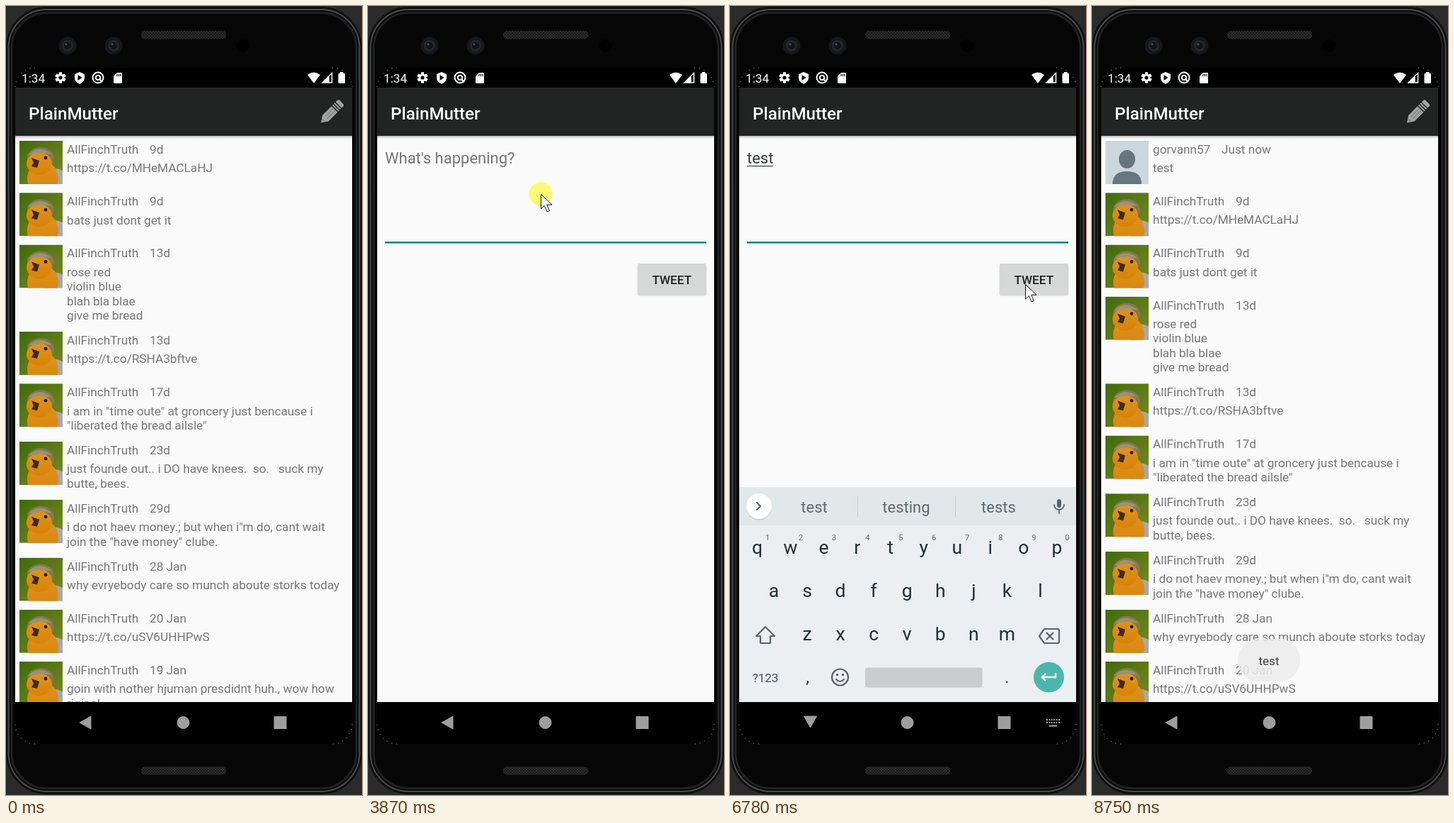
An HTML page for the animation above (9.06 s loop, 503x1112 px).

```html
<!DOCTYPE html>
<html lang="en">
<head>
<meta charset="utf-8">
<title>Phone demo</title>
<style>
html, body { margin: 0; width: 100%; height: 100%; overflow: hidden; background: #2b2b2c; }
svg { display: block; width: 503px; height: 1112px; font-family: Roboto, sans-serif; }
text { white-space: pre; }
.mid { text-anchor: middle; }
.line { fill: none; stroke: #56646b; stroke-width: 2.2; stroke-linejoin: round; stroke-linecap: round; }
</style>
</head>
<body>
<svg id="stage" viewBox="0 0 503 1112"></svg>
<script>
const LOOP = 9060;
const NAME = 'AllFinchTruth';
const ROWS = [
  ['9d', 'https://t.co/MHeMACLaHJ'],
  ['9d', 'bats just dont get it'],
  ['13d', 'rose red', 'violin blue', 'blah bla blae', 'give me bread'],
  ['13d', 'https://t.co/RSHA3bftve'],
  ['17d', 'i am in "time oute" at groncery just bencause i', '"liberated the bread ailsle"'],
  ['23d', 'just founde out.. i DO have knees.  so.   suck my', 'butte, bees.'],
  ['29d', 'i do not haev money.; but when i"m do, cant wait', 'join the "have money" clube.'],
  ['28 Jan', 'why evryebody care so munch aboute storks today'],
  ['20 Jan', 'https://t.co/uSV6UHHPwS'],
  ['19 Jan', 'goin with nother hjuman presdidnt huh., wow how', 'riginal..']
];

const rect = (x, y, w, h, fill, more = '') =>
  `<rect x="${x}" y="${y}" width="${w}" height="${h}" fill="${fill}" ${more}/>`;
const disc = (x, y, r, fill, more = '') =>
  `<circle cx="${x}" cy="${y}" r="${r}" fill="${fill}" ${more}/>`;
const path = (d, more = '') => `<path d="${d}" ${more}/>`;
const text = (x, y, size, fill, str, more = '') =>
  `<text x="${x}" y="${y}" font-size="${size}" fill="${fill}" ${more}>${str}</text>`;

function row(y, pic, name, timeX, [age, ...lines]) {
  const grey = '#777';
  return `<use href="#${pic}" x="19" y="${y}"/>` +
    text(86, y + 18, 17.2, grey, name) + text(timeX, y + 18, 17.2, grey, age) +
    lines.map((s, i) => text(86, y + 44.3 + i * 20.4, 17.2, grey, s)).join('');
}

function rows() {
  let y = 190;
  return ROWS.map(r => {
    const out = row(y, 'bird', NAME, 203, r);
    y += Math.max(73.2, 41 + 20.4 * (r.length - 1));
    return out;
  }).join('');
}

const windowBack = rect(13, 87, 476, 953, '#000') + rect(13, 183, 476, 798, '#fafafa') +
  rect(13, 183, 476, 4, 'url(#drop)') + rect(13, 115, 476, 68, '#212423') +
  text(32, 159.6, 24.2, '#fff', 'PlainMutter', 'font-weight="500"');

const pencil = `<g transform="translate(445 164.5) rotate(-45)" fill="#a3a3a3">
  ${path('M0 0L9-6H27V6H9Z')}${rect(28.5, -6, 2, 12, '#a3a3a3')}${rect(32, -6, 2, 12, '#a3a3a3')}
  ${path('M35.5-6H38Q41-6 41-3V3Q41 6 38 6H35.5Z')}
  ${path('M10-2H26M10 2H26M5-3V3', 'stroke="#777" fill="none"')}</g>`;

function keyRow(keys, x, y) {
  return [...keys].map((k, i) => text(x + i * 47.05, y, 26.5, '#1f2e35', k, 'class="mid"')).join('');
}

const keyboard = rect(13, 678, 476, 303, '#ebeff1') + rect(13, 678, 476, 54, '#e2e7ea') +
  disc(41, 706.5, 18, '#c5cace') + disc(41, 705, 18, '#fff') +
  rect(462, 695, 6, 12, '#56646b', 'rx="3"') +
  path('M458 703a7 7 0 0 0 14 0M465 711v4', 'class="line" style="stroke-width:1.8"') +
  `<g id="tools">${path('M43 700l-5 5 5 5', 'class="line"')}
    <circle cx="102" cy="702" r="6" class="line"/>${path('M107 707l6 6', 'class="line"')}
    ${path('M166 696h14q2 0 2 2v10l-6 6h-10q-2 0-2-2v-14q0-2 2-2M182 708h-4q-2 0-2 2v4M168 707q4 4 8 0', 'class="line" style="stroke-width:1.8"')}
    ${disc(169.5, 702, 1.3, '#56646b')}${disc(176.5, 702, 1.3, '#56646b')}
    ${text(241.5, 711.5, 18, '#56646b', 'GIF', 'class="mid" font-weight="900" letter-spacing="1"')}
    ${rect(302, 695, 21, 21, '#66737a', 'rx="2"')}${rect(353.5, 691, 1, 28, '#c8ced1')}
    ${[389.5, 397.5, 405.5].map(x => disc(x, 705, 2.6, '#56646b')).join('')}</g>` +
  `<g id="words">${path('M38 700l5 5-5 5', 'class="line"')}
    ${[['test', 119], ['testing', 249], ['tests', 379.5]].map(([s, x]) =>
      text(x, 714, 22, '#5d6a70', s, 'class="mid"')).join('')}
    ${rect(180, 691, 1, 29, '#c5cbce')}${rect(318, 691, 1, 29, '#c5cbce')}</g>` +
  keyRow('qwertyuiop', 38.5, 772) + keyRow('asdfghjkl', 62, 832.5) + keyRow('zxcvbnm', 109, 894) +
  [...'1234567890'].map((d, i) => text(53 + i * 47.05, 753, 11.5, '#5f6c72', d, 'class="mid"')).join('') +
  path('M50 875l13 13h-6v10h-14v-10h-6z', 'class="line"') +
  path('M444 878h19q2 0 2 2v16q0 2-2 2h-19l-7-10zM447.500 883.500l9 9m0-9l-9 9', 'class="line"') +
  text(50, 952.5, 17, '#46545b', '?123', 'class="mid"') +
  text(109.5, 954, 24, '#1f2e35', ',', 'class="mid"') + text(391.5, 954, 24, '#46545b', '.', 'class="mid"') +
  `<circle cx="155.500" cy="946" r="11.500" class="line"/>` +
  path('M150 949q5.500 6 11 0', 'class="line"') + disc(151.5, 942.5, 1.7, '#56646b') + disc(159.5, 942.5, 1.7, '#56646b') +
  rect(191, 932.5, 165.500, 28, '#c9cdd0', 'rx="3"') + disc(450.5, 946, 21.500, '#4db6ac') +
  path('M460 940v6h-19m5-5l-5 5 5 5', 'fill="none" stroke="#fff" stroke-width="2.4"');

function gear() {
  let teeth = '';
  for (let a = 0; a < 360; a += 60) teeth += rect(75, 93.5, 4, 15, '#fff', `transform="rotate(${a} 77 101)"`);
  return teeth + disc(77, 101, 5.5, '#fff') + disc(77, 101, 2.6, '#000');
}

const statusBar = text(22, 108, 17.2, '#fff', '1:34') + gear() +
  path('M104 93l7 3v5q0 6-7 9-7-3-7-9v-5z', 'fill="#fff"') + path('M101.500 97v8l6-4z', 'fill="#000"') +
  '<g fill="none" stroke="#fff" stroke-width="2"><circle cx="130" cy="101" r="7.500"/><circle cx="130" cy="101" r="3.200"/><path d="M132 103l4 4"/></g>' +
  path('M157 94h6q1 0 1 1v13q0 1-1 1h-10q-1 0-1-1v-9z', 'fill="#fff"') +
  path('M157 96v3m2.500-3v3m2.500-3v3', 'stroke="#000" stroke-width="1.2"') +
  path('M426 97q9-7 18 0l-9 12z', 'fill="#fff"') +
  path('M447 108h13.500v-13.500zM456 100v7', 'fill="none" stroke="#fff" stroke-width="1.5"') +
  path('M447 108.500l9-9v9z', 'fill="#fff"') +
  rect(469.5, 95, 9.5, 14, '#fff', 'rx="1"') + rect(472, 93, 4.5, 3, '#fff');

const nav = '<g fill="#9e9e9e" stroke="#9e9e9e" stroke-linejoin="round">' +
  path('M104 1010l16-9v18z', 'id="back"') + path('M104.500 1001h18l-9 16z', 'id="down"') +
  '<circle cx="250.500" cy="1010" r="8.500"/><rect x="379" y="1001.500" width="17" height="17"/></g>' +
  '<g id="kbdIcon">' + path('M447 1006h19M447 1010h19', 'stroke="#aaa" stroke-width="2" stroke-dasharray="2 1.400"') +
  path('M451 1014.500h11', 'stroke="#aaa" stroke-width="2"') + '</g>';

const lens = x => disc(x, 56, 12.5, '#15171a') + disc(x, 56, 8, '#23262b') + disc(x, 56, 5, '#101318') + disc(x - 2, 54, 1.5, '#4c525c');
const speaker = y => rect(191, y, 120, 11.5, '#1b1b1b', 'rx="5"') + rect(191, y, 120, 11.5, 'url(#mesh)', 'rx="5"');

const phone = rect(0, 0, 503, 1112, '#2b2b2c') +
  rect(1, 2, 501, 1108, '#0b0b0c', 'rx="56" stroke="#111" stroke-width="2"') +
  rect(3.5, 5, 496, 1102, 'none', 'rx="54" stroke="#4b4c4e" stroke-width="2"') +
  rect(8, 9.5, 487, 1093, '#060607', 'rx="50" stroke="#232425" stroke-width="2.500"') +
  speaker(35) + speaker(1072) + lens(87) + lens(152) + disc(335, 56, 9, '#000');

document.getElementById('stage').innerHTML = `<defs>
  <linearGradient id="drop" x2="0" y2="1"><stop stop-color="#000" stop-opacity=".25"/><stop offset="1" stop-color="#000" stop-opacity="0"/></linearGradient>
  <linearGradient id="leaf" x2="1" y2="1"><stop stop-color="#3f6a0c"/><stop offset="1" stop-color="#7c8a22"/></linearGradient>
  <linearGradient id="plume" x2="0" y2="1"><stop stop-color="#dd9420"/><stop offset="1" stop-color="#d98206"/></linearGradient>
  <pattern id="mesh" width="4" height="4" patternUnits="userSpaceOnUse"><path d="M0 0l4 4M4 0l-4 4" stroke="#303030" stroke-width=".8"/></pattern>
  <clipPath id="screen"><rect x="13" y="87" width="476" height="953" rx="29"/></clipPath>
  <clipPath id="list"><rect x="13" y="183" width="476" height="798"/></clipPath>
  <clipPath id="pic"><rect width="61" height="61"/></clipPath>
  <g id="bird"><g clip-path="url(#pic)">${rect(0, 0, 61, 61, 'url(#leaf)')}
    <ellipse cx="50" cy="54" rx="17" ry="15" fill="#a5a9aa"/><ellipse cx="30" cy="24" rx="19" ry="15" fill="#84784f"/>
    <ellipse cx="33" cy="53" rx="22" ry="24" fill="url(#plume)"/><ellipse cx="28" cy="32" rx="18" ry="16" fill="url(#plume)"/>
    <path d="M12 20Q28 4 46 19Q30 15 12 20Z" fill="#9a9278"/>
    <path d="M17 24L28 28L25 38L17 36L20 31Z" fill="#3c2c1c"/>${disc(37, 24, 2.4, '#1d1812')}</g></g>
  <g id="person"><g clip-path="url(#pic)">${rect(0, 0, 61, 61, '#ccd6dd')}
    <ellipse cx="30.500" cy="26" rx="11.500" ry="13" fill="#66757f"/><path d="M10 61Q10 43 30.500 43Q51 43 51 61Z" fill="#66757f"/></g></g>
</defs>${phone}
<g clip-path="url(#screen)">
  ${rect(13, 87, 476, 953, '#000')}
  <g id="feed">${windowBack}${pencil}
    <circle id="ripple" cx="459.500" cy="149.500" fill="#fff"/>
    <g clip-path="url(#list)"><g id="rows">${rows()}</g><g id="newRow">${row(190, 'person', 'gorvann57', 183, ['Just now', 'test'])}</g></g></g>
  <g id="compose">${windowBack}
    ${text(24, 222, 22, '#777', 'What\'s happening?', 'id="hint"')}
    ${text(24, 222, 22, '#3a4043', '', 'id="typed"')}
    ${rect(24, 225, 37, 1.2, '#3a4043', 'id="under"')}
    ${rect(0, 198, 2.6, 30, '#058b80', 'id="caret"')}
    ${rect(24, 332, 454, 2.6, '#058b80', 'id="edge"')}
    ${rect(380.5, 364.5, 98, 44, '#000', 'rx="3" opacity=".13"')}${rect(381, 363, 97, 44, '#d6d7d7', 'rx="2"')}
    ${rect(381, 363, 97, 44, '#000', 'rx="2" id="press"')}
    ${text(429.3, 391.5, 17.2, '#222', 'TWEET', 'class="mid" font-weight="500"')}</g>
  <g id="kb">${keyboard}</g>
  ${nav}${statusBar}
  <g id="toast">${rect(206, 892, 88, 60, '#ededed', 'rx="29"')}${text(250, 929, 17.2, '#1c1c1c', 'test', 'class="mid"')}</g>
</g>
${path('M13 114A28 28 0 0 1 41 87M461 87A28 28 0 0 1 489 114M489 1012A28 28 0 0 1 461 1040M41 1040A28 28 0 0 1 13 1012',
  'fill="none" stroke="#bbb" stroke-dasharray="1 6"')}
<g id="mouse">${disc(0, 0, 16.5, '#fff95f', 'id="glow" opacity=".85"')}
  ${path('M.5.5V21l4.700-4.500 4 8.500 3.300-1.500-3.800-8.300H16z', 'fill="#fff" stroke="#111" stroke-linejoin="round"')}</g>`;

// Runs of screen updates: start, end, count.
const RUNS = [[0, 0, 1], [120, 170, 2], [570, 1280, 10], [1450, 1900, 7], [2380, 2700, 5], [2850, 3090, 4],
  [3250, 3620, 6], [3800, 4020, 4], [4250, 4970, 10], [5450, 5520, 2], [5930, 6530, 9], [6690, 6780, 2],
  [7010, 7010, 1], [7180, 7450, 5], [7620, 7770, 3], [8340, 8750, 6]];

// Pointer stretches: each is a list of [time, x, y], hidden in between.
const TRAILS = [
  [[120, 489, 89], [170, 489, 89]],
  [[570, 415, -14], [1280, 462, 142], [1900, 462, 142]],
  [[2530, 462, 300], [2700, 461, 492], [2770, 461, 492], [3090, 378, 451], [3180, 378, 451], [3620, 244, 265],
    [5380, 244, 265], [5520, 261, 151], [5860, 261, 151], [6450, 412, 422], [6530, 412, 395], [6600, 412, 395],
    [6690, 414, 394], [6780, 417, 392], [7315, 417, 392], [7383, 485, 561], [7450, 485, 561]]
];
const CLICKS = [[1450, 1740], [3800, 4015], [7180, 7310]];
const CARET = [[3940, 4400], [4640, 5480], [5990, 6500], [7010, 7690], [8340, LOOP]];
const CARET_X = [23, 30, 42, 53, 60.5];

const $ = Object.fromEntries([...document.querySelectorAll('#stage [id]')].map(e => [e.id, e]));
const set = (el, attrs) => { for (const k in attrs) el.setAttribute(k, attrs[k]); };
const show = (el, on) => { el.style.display = on ? '' : 'none'; };
const clamp = v => Math.max(0, Math.min(1, v));
const within = (list, t) => list.some(([a, b]) => t >= a && t < b);
const ease = p => 1 - (1 - p) ** 3;
const zoom = s => ({ transform: `translate(251 563) scale(${s}) translate(-251 -563)` });

function snap(t) {
  const [a, b, n] = RUNS.filter(r => t + 5 >= r[0]).pop();
  if (n < 2) return a;
  const gap = (b - a) / (n - 1);
  return a + Math.min(n - 1, Math.floor((t + 5 - a) / gap)) * gap;
}

function pointer(t) {
  const trail = TRAILS.find(p => t >= p[0][0] && t < p[p.length - 1][0] - 1);
  if (!trail) return null;
  const i = trail.findIndex(k => k[0] > t), [t0, x0, y0] = trail[i - 1], [t1, x1, y1] = trail[i];
  const p = (t - t0) / (t1 - t0);
  return [x0 + (x1 - x0) * p, y0 + (y1 - y0) * p];
}

function draw(t) {
  const enter = clamp((t - 2340) / 360), leave = clamp((t - 8360) / 330);
  const back = t > 8380;

  set($.feed, zoom(back ? 1.05 - 0.05 * ease(leave) : 1 + 0.05 * ease(enter)));
  set($.rows, { transform: `translate(0 ${back ? 73.2 : 0})` });
  show($.newRow, back);
  show($.feed, enter < 1 || back);
  const wave = clamp((t - 1400) / 225);
  set($.ripple, { r: 24.5 * ease(wave), opacity: t < 1450 ? 0 : 0.2 * clamp((1900 - t) / 220) });

  set($.compose, zoom(back ? 1 - 0.1 * ease(leave) : 0.85 + 0.15 * ease(enter)));
  set($.compose, { opacity: back ? clamp(1.25 - leave * 2.5) : clamp((enter - 0.1) * 4.5) });
  show($.compose, enter > 0 && leave < 1);

  const count = t < 4640 ? 0 : Math.min(4, 1 + Math.floor((t - 4640) / 80));
  $.typed.textContent = 'test'.slice(0, count);
  show($.hint, !count);
  set($.hint, { fill: t < 3940 ? '#777' : '#9b9b9b' });
  show($.under, count);
  set($.under, { width: CARET_X[count] - 23.5 });
  set($.caret, { x: CARET_X[count] });
  show($.caret, within(CARET, t));
  const focus = t > 3860;
  set($.edge, { height: focus ? 2.6 : 1.2, fill: focus ? '#058b80' : '#808080' });
  set($.press, { opacity: t < 7175 ? 0 : 0.14 * clamp((7450 - t) / 200) });

  const rise = clamp((t - 4250) / 340);
  const drop = back ? 60 * leave ** 2 : 60 * (1 - rise) ** 2;
  set($.kb, { transform: `translate(0 ${drop})`, opacity: back ? clamp(1.2 - leave * 2) : clamp(rise * 1.35) });
  show($.kb, rise > 0 && leave < 1);
  show($.tools, count < 4);
  show($.words, count === 4);
  const typing = t > 4400 && !back;
  show($.back, !typing);
  show($.down, typing);
  show($.kbdIcon, typing);
  set($.toast, { opacity: 0.85 * clamp((t - 8580) / 170) });

  const at = pointer(t);
  show($.mouse, at);
  if (at) set($.mouse, { transform: `translate(${at[0]} ${at[1]})` });
  show($.glow, within(CLICKS, t));
}

const start = performance.now();
function tick() {
  draw(snap((performance.now() - start) % LOOP));
  requestAnimationFrame(tick);
}
tick();
</script>
</body>
</html>
```
